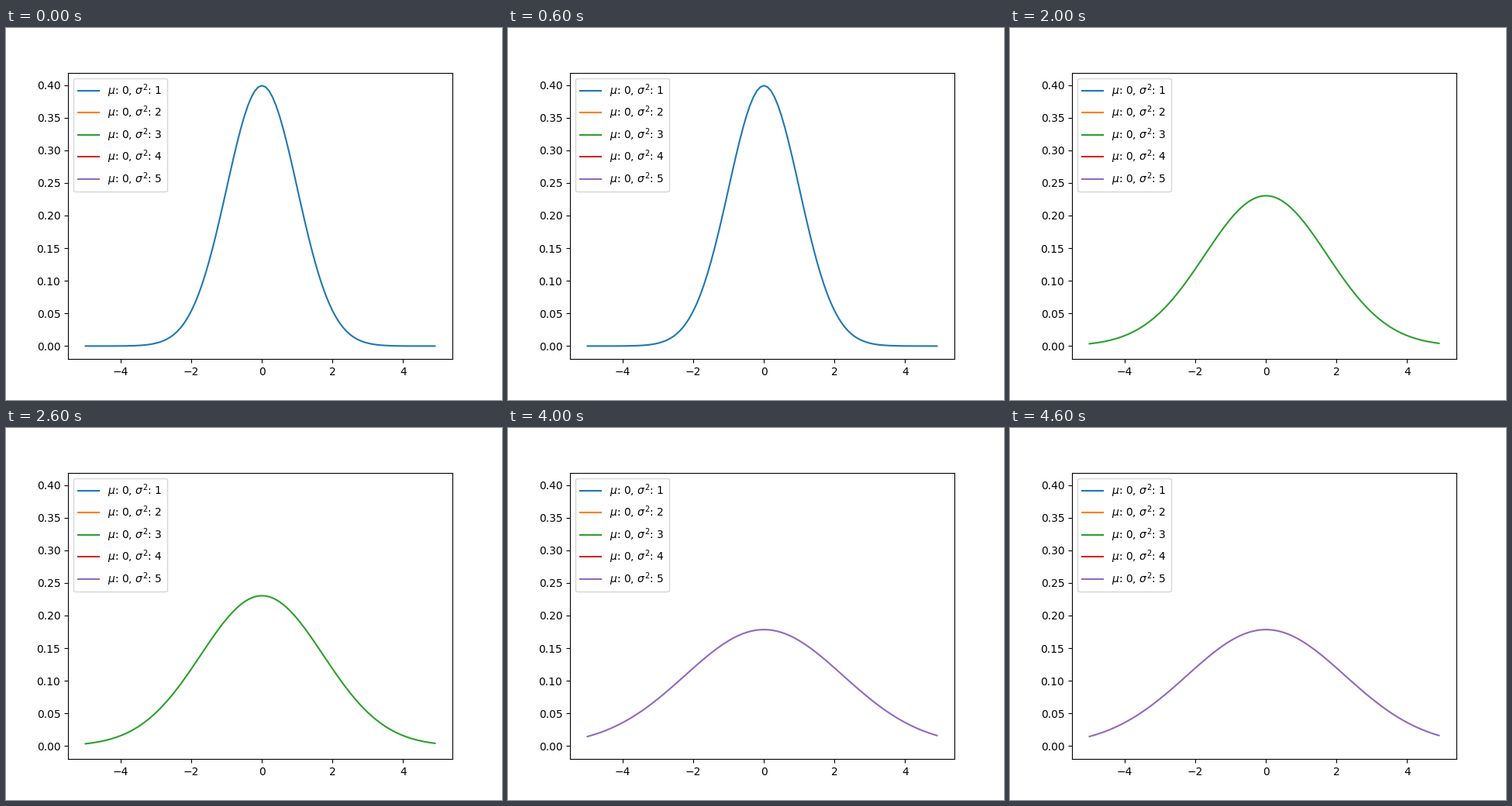
A matplotlib script that plays this animation: 640 by 480 pixels, repeating every 5000 ms.

```python
import numpy as np
import matplotlib.pyplot as plt
from matplotlib.animation import ArtistAnimation

MU = 0
VARIANCES = range(1, 6)


def normal_pdf(x, mu, var):
    return np.exp(-(x - mu) ** 2 / (2 * var)) / np.sqrt(2 * np.pi * var)


fig, ax = plt.subplots(figsize=(6.4, 4.8), dpi=100)
x = np.arange(-5, 5, 0.1)

# One curve per step; the colour cycle gives each its own colour.
curves = [
    ax.plot(x, normal_pdf(x, MU, var), label=rf"$\mu$: {MU}, $\sigma^2$: {var}")
    for var in VARIANCES
]
ax.legend(loc="upper left")

anim = ArtistAnimation(fig, curves, interval=1000, repeat=True)

plt.show()
```
